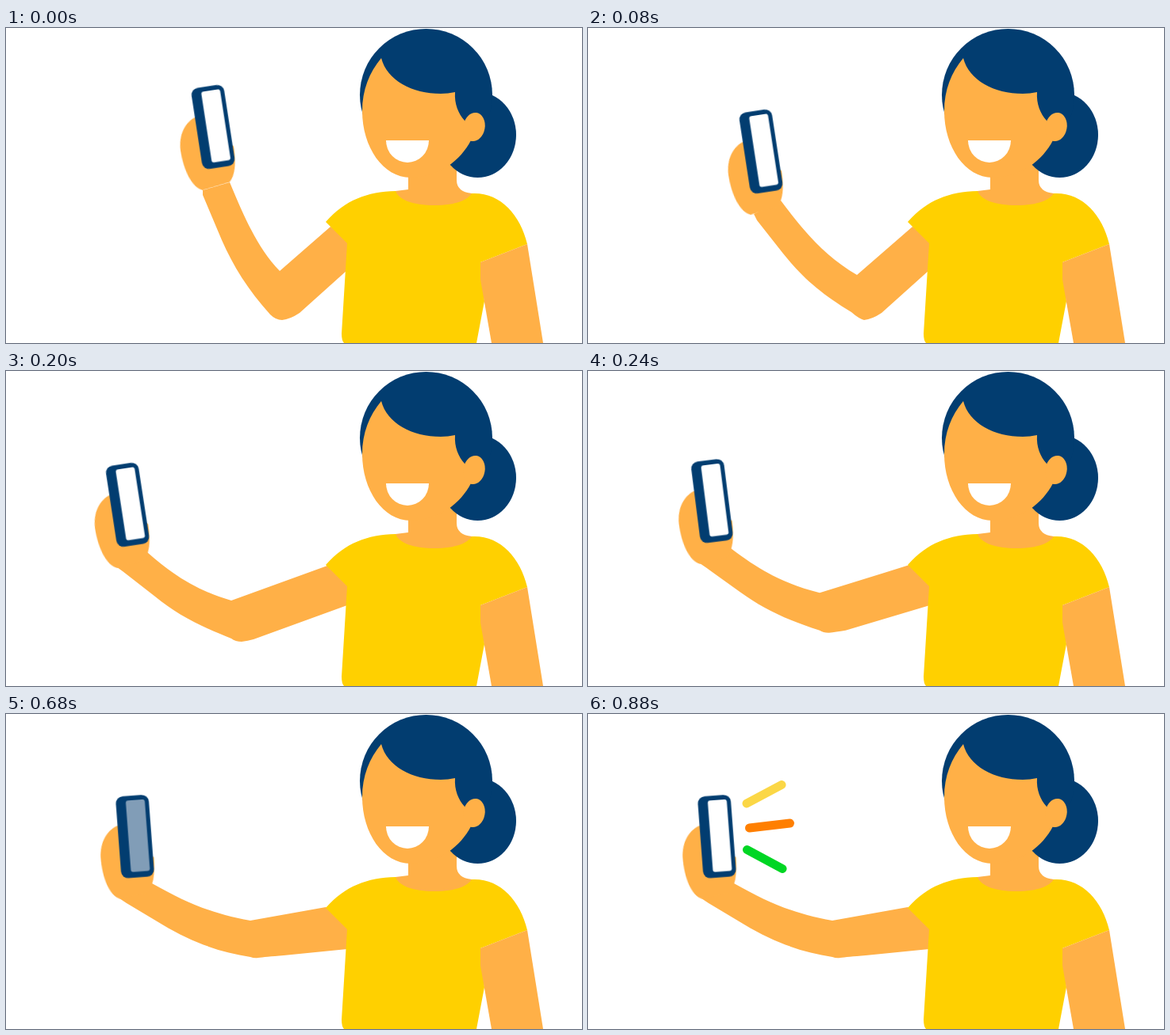
These frames come from a looping animation (726x398 px, 2.12 s). An HTML page without scripts:

```html
<!DOCTYPE html>
<html lang="en">
<head>
<meta charset="utf-8">
<title>Selfie</title>
<style>
  html, body { margin: 0; width: 100%; height: 100%; overflow: hidden; background: #fff; }
  svg { display: block; width: 726px; height: 398px; }

  .skin { fill: #ffb047; }
  .navy { fill: #023d70; }
  .shirt { fill: #ffd000; }
  .white { fill: #fff; }

  .arm, .hand, .screen, .rays, .rays line { animation: 2120ms infinite; }
  .arm { animation-name: reach; }
  .hand { animation-name: lift; }
  .screen { animation-name: flash; animation-timing-function: step-end; }
  .rays {
    stroke-width: 11; stroke-linecap: round;
    animation-name: show; animation-timing-function: step-end;
  }
  .rays line { stroke-dasharray: 1 2; animation-name: grow; }

  /* Motion advances every 40 ms */
  @keyframes reach {
    0% {
      d: path("M248 205 L248 211 L272 268 C286 300 305 331 333 362 Q340 369 348 369 Q358 368 370 360 L430 306 L440 270 L409 251 L345 307 C318 279 302 243 282 195 Z");
      animation-timing-function: steps(2);
    }
    3.773% {
      d: path("M209 235 L213 243 L246 285 C270 315 293 335 332 359 Q341 367 348 369 Q358 368 370 360 L430 306 L440 270 L409 251 L339 312 C300 289 276 262 243 218 Z");
      animation-timing-function: steps(1);
    }
    5.66% {
      d: path("M165 238 L169 244 L208 283 C234 310 262 329 305 350 Q311 354 320 354 Q330 353 340 348 L430 300 L440 270 L408 249 L308 301 C265 283 240 265 198 220 Z");
      animation-timing-function: steps(2);
    }
    9.433% {
      d: path("M140 248 L147 253 L188 285 C216 308 244 322 284 338 Q289 342 297 342 Q305 341 312 339 L430 296 L440 270 L405 246 L284 290 C243 278 213 260 178 229 Z");
      animation-timing-function: steps(3);
    }
    15.094%, 100% {
      d: path("M143 233 L152 239 L197 266 C235 289 270 301 308 307 Q313 309 318 308 Q326 307 350 305 L430 297 L440 270 L403 244 L308 261 C262 253 228 239 184 214 Z");
    }
  }

  @keyframes lift {
    0% { transform: translate(261px, 125px) rotate(-8.7deg); animation-timing-function: steps(2); }
    3.773% { transform: translate(218px, 156px) rotate(-8.7deg); animation-timing-function: steps(1); }
    5.66% { transform: translate(175.5px, 158px) rotate(-6.2deg); animation-timing-function: steps(2); }
    9.433% { transform: translate(153.2px, 169px) rotate(-8.7deg); animation-timing-function: steps(3); }
    15.094%, 100% { transform: translate(162.5px, 154.8px) rotate(-4.3deg); }
  }

  @keyframes flash {
    0%, 33.962%, 100% { fill: #fff; }
    32.075% { fill: #819db7; }
  }

  @keyframes show {
    0% { opacity: 0; }
    35.849%, 100% { opacity: 1; }
  }

  @keyframes grow {
    0% { stroke-dashoffset: 1; }
    33.962% { stroke-dashoffset: 1; animation-timing-function: steps(4); }
    41.509%, 100% { stroke-dashoffset: 0; }
  }
</style>
</head>
<body>
<svg viewBox="0 0 726 398">
  <path class="arm skin" d="M143 233 L152 239 L197 266 C235 289 270 301 308 307 Q313 309 318 308 Q326 307 350 305 L430 297 L440 270 L403 244 L308 261 C262 253 228 239 184 214 Z"/>

  <g class="hand" transform="translate(162.5 154.8) rotate(-4.3)">
    <path class="skin" d="M-18.8 -16 C-34 -12 -45 4 -45 24 C-45 48 -38 72 -25 77 L10 72 C18 65 22 50 22 28 Z"/>
    <rect class="navy" x="-20.8" y="-51.8" width="41.6" height="103.6" rx="9"/>
    <rect class="screen white" x="-8.3" y="-46" width="24" height="90.5" rx="3"/>
  </g>

  <g class="rays">
    <line x1="200" y1="113" x2="244" y2="89.5" stroke="#fbd746" pathLength="1"/>
    <line x1="203.5" y1="144" x2="254.5" y2="138" stroke="#ff7f00" pathLength="1"/>
    <line x1="200.5" y1="171.5" x2="245" y2="195.5" stroke="#00d624" pathLength="1"/>
  </g>

  <!-- body -->
  <path class="shirt" d="M403 245 C428 217 455 207 491 206 L587 209 C622 207 648 235 657 273 L598 296 L603 345 L593 398 H426 Q423 395 423 386 L430 272 Z"/>
  <path class="skin" d="M598 296 L657 273 L677 398 H612 L598 318 Z"/>
  <path class="skin" d="M507 180 V204 L491 206 C495 217 513 224 540 224 C568 224 582 217 587 209 Q568 207 568 192 V165 Z"/>

  <!-- head -->
  <ellipse class="navy" cx="594.5" cy="135" rx="48.5" ry="54"/>
  <circle class="navy" cx="529.5" cy="84.5" r="83.5"/>
  <path class="skin" d="M473 38 C480 66 512 83 548 83 Q557 83 566 81 C565 96 570 108 578 117 L586 142 C573 167 546 189 510 189 C475 189 449 150 449 105 C449 78 458 56 473 38 Z"/>
  <ellipse class="skin" cx="590" cy="125" rx="13.6" ry="18.2" transform="rotate(10 590 125)"/>
  <path class="white" d="M479 142 H533 A27 28 0 0 1 479 142 Z"/>
</svg>
</body>
</html>
```
